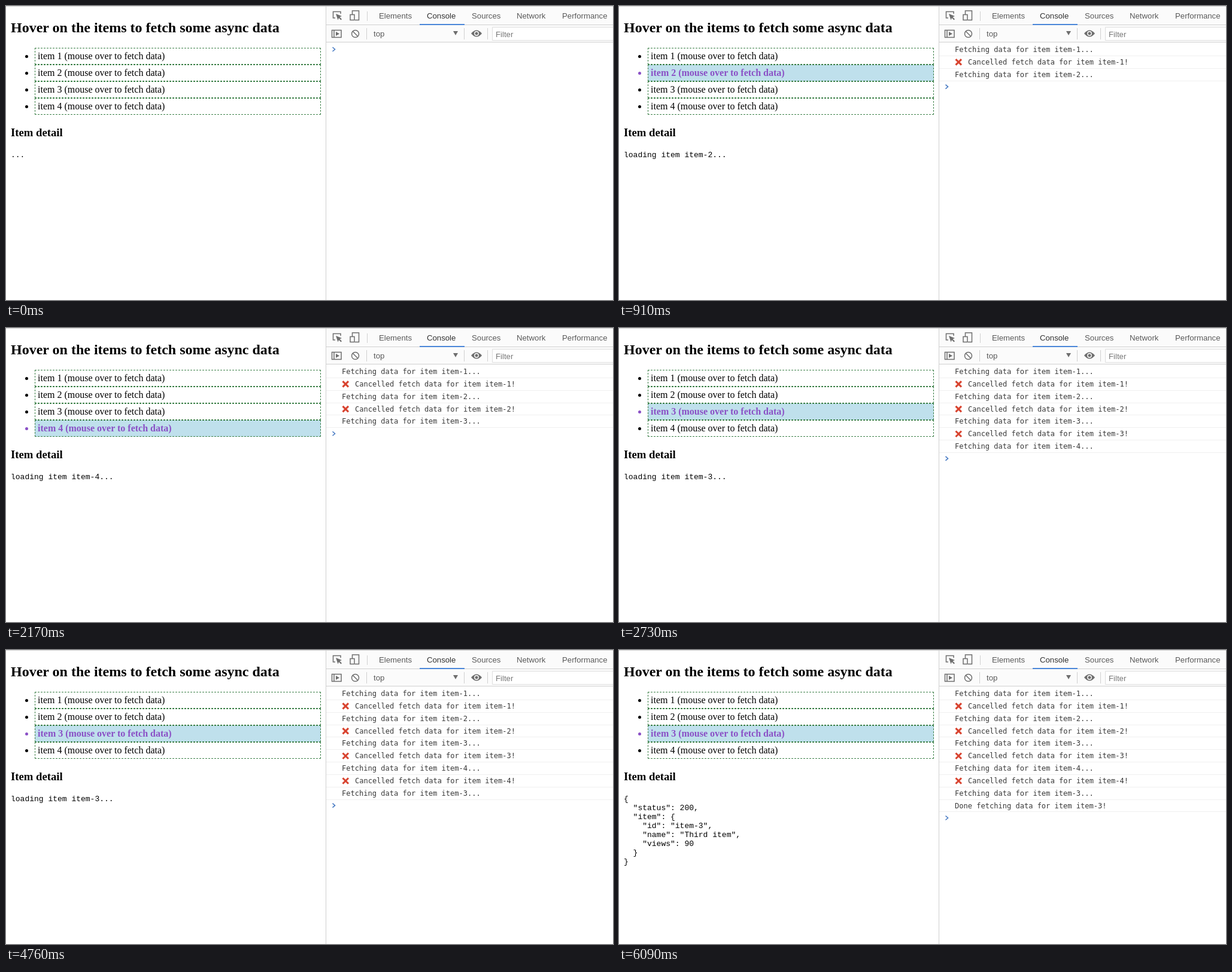
Recreate the animation shown at these times as an HTML page. Size 1014 by 492 pixels, loop 6160 ms.

```html
<!DOCTYPE html>
<html lang="en">
<head>
<meta charset="utf-8">
<title>Async data on hover</title>
<style>
  html, body { margin: 0; width: 100%; height: 100%; overflow: hidden; background: #fff; }
  body { position: relative; color: #000; font: 16px/18px "Liberation Serif", serif; }
  h2, h3, ul, pre, svg { position: absolute; margin: 0; left: 8px; white-space: pre; }
  h2 { top: 22px; font-size: 24px; line-height: 28px; }
  h3 { top: 201px; font-size: 18.72px; line-height: 21px; }
  ul { top: 70px; left: 0; width: 478px; padding: 0 0 0 48px; white-space: normal; }
  li { padding: 4px; border: 1px dashed #3c8048; }
  li.hover { background: #bfe0ec; color: #8a50c6; font-weight: bold; }
  pre { top: 242px; font: 13px/15px "Liberation Mono", monospace; }
  svg { left: 0; top: 0; }
  .ui { font: 13.2px "Liberation Sans", sans-serif; fill: #5a5a5a; }
  .log { font: 12.04px "DejaVu Sans Mono", monospace; fill: #383838; }
  .icon { fill: none; stroke: #6e6e6e; stroke-width: 1.5; }
  .solid { fill: #6e6e6e; }
  .rule { fill: none; stroke: #d0d0d0; }
</style>
</head>
<body>
<h2>Hover on the items to fetch some async data</h2>
<ul></ul>
<h3>Item detail</h3>
<pre></pre>
<svg width="1014" height="492">
  <path fill="#fbfbfb" d="M535 1H1014V60H535Z"/>
  <path class="rule" d="M0 .5H1014M534.5 1V492M535 31.5H1014M535 60.5H1014M603.5 9V25M602.5 37V56M765.5 37V56M804.5 37V56"/>
  <path fill="#4a86d8" d="M691 30H766V32H691Z"/>
  <path fill="#fff" stroke="#ddd" d="M812.5 35.5H1020V57.5H812.5Z"/>
  <g class="icon">
    <path d="M550 20H546.5V9.5H559V13"/>
    <path d="M578.5 14V8H589.5V23.5H583M575 14.5H582V23.5H575Z"/>
    <path d="M544.5 40.5H560V52.5H544.5ZM548 40V53"/>
    <circle cx="583.5" cy="46.5" r="6"/>
    <path d="M579 42L588 51"/>
  </g>
  <g class="solid">
    <path d="M551 13L561 17L557.5 18.5L561 22L559.5 23.5L556 20L554.5 23.5Z"/>
    <path d="M551 43L557 46.5L551 50Z"/>
    <path d="M747 42H755L751 49Z"/>
    <path d="M777 46Q786 35 795 46Q786 57 777 46Z"/>
  </g>
  <circle cx="786" cy="46" r="3.2" fill="#6e6e6e" stroke="#fff" stroke-width="1.4"/>
  <g class="ui">
    <text x="623" y="21">Elements</text>
    <text x="703" y="21" fill="#333">Console</text>
    <text x="778" y="21">Sources</text>
    <text x="853" y="21">Network</text>
    <text x="929" y="21">Performance</text>
    <text x="614" y="51">top</text>
    <text x="818" y="52" fill="#777">Filter</text>
  </g>
  <g id="console" class="log"></g>
  <path id="prompt" d="M545.5 -3.5L549.5 0L545.5 3.5" fill="none" stroke="#4a7cc4" stroke-width="1.6"/>
</svg>
<script>
const LOOP = 6160, ROW = 20.85, FIRST_ROW = 72.8;
const list = document.querySelector("ul");
const detail = document.querySelector("pre");
const consoleRows = document.getElementById("console");
const prompt = document.getElementById("prompt");

const loading = n => `loading item item-${n}...`;
const fetching = n => `Fetching data for item item-${n}...`;
const cancelled = n => `Cancelled fetch data for item item-${n}!`;
const result = JSON.stringify(
  { status: 200, item: { id: "item-3", name: "Third item", views: 90 } }, null, 2);

// Each track is a list of [start time, value].
const hovers = [[0, 0], [70, 1], [840, 2], [1470, 3], [2100, 4], [2660, 3]];
const details = [[0, "..."], [280, loading(1)],
  ...hovers.slice(2).map(([time, n]) => [time, loading(n)]), [4830, result]];
const logs = [[350, fetching(1)],
  [910, cancelled(1)], [910, fetching(2)],
  [1540, cancelled(2)], [1540, fetching(3)],
  [2240, cancelled(3)], [2240, fetching(4)],
  [2800, cancelled(4)], [2800, fetching(3)],
  [4900, "Done fetching data for item item-3!"]];

list.innerHTML = [1, 2, 3, 4].map(n => `<li>item ${n} (mouse over to fetch data)</li>`).join("");
consoleRows.innerHTML = logs.map(([, text], i) => {
  const y = FIRST_ROW + i * ROW;
  const failed = text.startsWith("Cancelled");
  const cross = failed
    ? `<path d="M562.5 ${y - 4.5}l9.5 9.5m0 -9.5l-9.5 9.5" stroke="#d8432f" stroke-width="3"/>` : "";
  return `<g>${cross}<text x="${failed ? 583 : 561}" y="${y + 4.2}">${text}</text>
    <path d="M535 ${Math.round(y + 10)}.5H1014" stroke="#f0f0f0"/></g>`;
}).join("");

const valueAt = (track, time) => track.filter(([start]) => start <= time).pop()[1];

function render(time) {
  const hovered = valueAt(hovers, time);
  [...list.children].forEach((item, i) => item.classList.toggle("hover", i + 1 === hovered));
  detail.textContent = valueAt(details, time);
  const count = logs.filter(([start]) => start <= time).length;
  [...consoleRows.children].forEach((row, i) =>
    row.setAttribute("visibility", i < count ? "visible" : "hidden"));
  prompt.setAttribute("transform", `translate(0 ${FIRST_ROW - 0.3 + count * ROW})`);
}

function tick() {
  render(performance.now() % LOOP);
  requestAnimationFrame(tick);
}
render(0);
requestAnimationFrame(tick);
</script>
</body>
</html>
```
